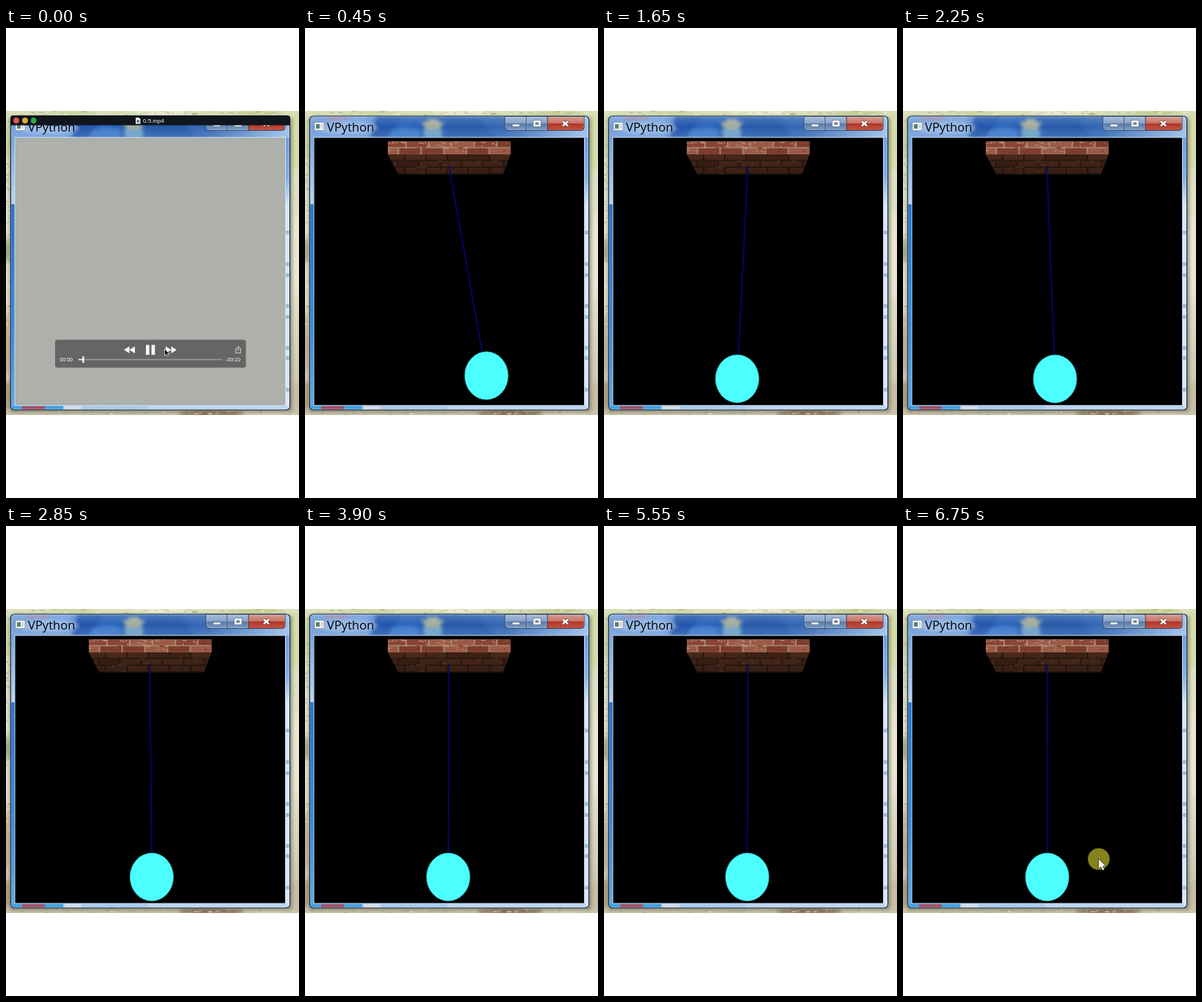
Write an HTML page that moves like this. It is 400 px wide and 640 px high and loops after 6.9 s.

```html
<!DOCTYPE html>
<html lang="en">
<head>
<meta charset="utf-8">
<title>Damped pendulum</title>
<style>
  html, body { margin: 0; width: 100%; height: 100%; overflow: hidden; background: #fff; }
  svg { display: block; width: 400px; height: 640px; }
  .title { font: 16.6px "Open Sans", "Noto Sans", sans-serif; fill: #000; }
  .small { font: 7px "Liberation Sans", Inter, sans-serif; fill: #fff; }
</style>
</head>
<body>
<svg viewBox="0 0 400 640">
  <defs>
    <linearGradient id="wall" x2="0" y2="1">
      <stop offset="0" stop-color="#d9dfb9"/><stop offset=".25" stop-color="#dfe1c5"/>
      <stop offset=".6" stop-color="#e3dfcb"/><stop offset="1" stop-color="#c8c1a9"/>
    </linearGradient>
    <linearGradient id="caption">
      <stop offset="0" stop-color="#6f9ddb"/><stop offset=".2" stop-color="#6f9dda"/>
      <stop offset=".3" stop-color="#2a63b9"/><stop offset=".52" stop-color="#285dae"/>
      <stop offset=".7" stop-color="#3468b4"/><stop offset="1" stop-color="#a0c3ea"/>
    </linearGradient>
    <linearGradient id="sheen" x2="0" y2="1">
      <stop offset="0" stop-color="#fff" stop-opacity=".2"/><stop offset=".5" stop-color="#fff" stop-opacity="0"/>
      <stop offset="1" stop-color="#bfe0ff" stop-opacity=".18"/>
    </linearGradient>
    <linearGradient id="leftTop" x2="0" y2="1">
      <stop offset="0" stop-color="#6fa4e0"/><stop offset="1" stop-color="#b5d5f3"/>
    </linearGradient>
    <linearGradient id="leftLow" x2="0" y2="1">
      <stop offset="0" stop-color="#1f6fd0"/><stop offset=".6" stop-color="#3089dd"/><stop offset="1" stop-color="#5aa7e8"/>
    </linearGradient>
    <linearGradient id="rightTop" x2="0" y2="1">
      <stop offset="0" stop-color="#6c9fdd"/><stop offset=".6" stop-color="#7fb1e8"/><stop offset="1" stop-color="#d3e6f8"/>
    </linearGradient>
    <linearGradient id="button" x2="0" y2="1">
      <stop offset="0" stop-color="#a9bfdc"/><stop offset=".48" stop-color="#86a2c8"/>
      <stop offset=".5" stop-color="#5878a4"/><stop offset="1" stop-color="#7c9fca"/>
    </linearGradient>
    <linearGradient id="close" x2="0" y2="1">
      <stop offset="0" stop-color="#d89d94"/><stop offset=".48" stop-color="#c67367"/>
      <stop offset=".5" stop-color="#ae3528"/><stop offset="1" stop-color="#c75442"/>
    </linearGradient>
    <linearGradient id="shade" x2="0" y2="1">
      <stop offset="0" stop-color="#000" stop-opacity=".05"/><stop offset="1" stop-color="#000" stop-opacity=".3"/>
    </linearGradient>
    <filter id="soft" x="-50%" y="-50%" width="200%" height="200%"><feGaussianBlur stdDeviation="2"/></filter>
    <filter id="edge" x="-10%" y="-10%" width="120%" height="120%"><feGaussianBlur stdDeviation=".7"/></filter>
    <clipPath id="wallClip"><rect y="113" width="400" height="414"/></clipPath>
    <clipPath id="winClip"><rect x="6" y="120" width="382" height="400" rx="5"/></clipPath>
    <clipPath id="frontClip"><path d="M113 154.500H280.500V172H113Z"/></clipPath>
    <clipPath id="underClip"><path d="M113 172H280.500L270 199.500H127.500Z"/></clipPath>
  </defs>

  <g clip-path="url(#wallClip)">
    <rect y="113" width="400" height="414" fill="url(#wall)"/>
    <g filter="url(#soft)" id="foliage"></g>
    <g filter="url(#edge)" id="grain"></g>
    <rect x="5" y="121" width="386" height="402" rx="5" fill="#4a4a3c" opacity=".45" filter="url(#soft)"/>
  </g>

  <g clip-path="url(#winClip)">
    <rect x="6" y="119" width="382" height="402" fill="#a9caee"/>
    <rect x="6" y="119" width="382" height="31" fill="url(#caption)"/>
    <g filter="url(#soft)">
      <path d="M98 119H134L112 150H90Z" fill="#2257ac"/>
      <path d="M118 140Q138 130 156 139V150H114Z" fill="#3a78ca"/>
      <path d="M159 128H167V124H182V128H189L184 138H165Z" fill="#a3ad9d"/>
      <path d="M161 138H187V150H163Z" fill="#6a9fc4"/>
      <path d="M192 124H238L258 150H192Z" fill="#275aa9"/>
      <path d="M30 120H62L54 126H26Z" fill="#c06f83" opacity=".5"/>
      <ellipse cx="58" cy="136" rx="41" ry="8" fill="#b8d0ef" opacity=".55"/>
    </g>
    <rect x="6" y="119" width="382" height="31" fill="url(#sheen)"/>
    <rect x="6" y="149" width="7" height="91" fill="url(#leftTop)"/>
    <rect x="6" y="240" width="7" height="281" fill="url(#leftLow)"/>
    <rect x="381" y="149" width="7" height="91" fill="url(#rightTop)"/>
    <rect x="381" y="240" width="7" height="281" fill="#dae7f6"/>
    <g filter="url(#edge)" id="streaks"></g>
    <g filter="url(#edge)">
      <rect x="6" y="514" width="72" height="6" fill="#3f9fe2"/>
      <rect x="22" y="515" width="31" height="5" fill="#a34c65"/>
      <rect x="80" y="515" width="23" height="5" fill="#d4dce9"/>
      <rect x="104" y="514" width="90" height="6" fill="#a9cbee"/>
      <rect x="194" y="514" width="190" height="6" fill="#bcd6f1"/>
    </g>
  </g>
  <rect x="6.500" y="120" width="381" height="400" rx="5" fill="none" stroke="#17283f" stroke-width="1.200"/>
  <rect x="7.600" y="121.100" width="378.800" height="397.800" rx="4" fill="none" stroke="#e4f2ff" stroke-opacity=".45" stroke-width=".8"/>

  <rect x="13" y="128.500" width="13" height="11" fill="#f4f5f2" stroke="#8a9299" stroke-width=".7"/>
  <rect x="15" y="131" width="5" height="6" fill="#52807a"/>
  <rect x="21" y="131" width="3.500" height="6" fill="#d5d9d8"/>
  <text class="title" x="30" y="140.500">VPython</text>

  <g stroke="#2d4059" stroke-width=".9">
    <path d="M273 120.500H302V139.500H277Q273 139.500 273 135.500Z" fill="url(#button)"/>
    <path d="M302 120.500H331V139.500H302Z" fill="url(#button)"/>
    <path d="M331 120.500H381V135.500Q381 139.500 377 139.500H331Z" fill="url(#close)"/>
  </g>
  <path d="M274 135.500V121.300H301V138.700H277M303 121.300H330V138.700H303ZM332 121.300H380V136" fill="none" stroke="#fff" stroke-opacity=".4" stroke-width=".6"/>
  <rect x="283" y="131" width="10" height="3.200" fill="#fff" stroke="#4c5a70" stroke-width=".6"/>
  <path d="M311.500 125.500H322V134.500H311.500ZM314.800 128.700V131.300H318.700V128.700Z" fill="#fff" fill-rule="evenodd" stroke="#4c5a70" stroke-width=".6"/>
  <g fill="none" stroke-width="4"><path d="M351.500 126.800L359.300 133.600M359.300 126.800L351.500 133.600" stroke="#6d322e"/>
    <path d="M351.800 127L359 133.400M359 127L351.800 133.400" stroke="#fff" stroke-width="2.500"/></g>

  <rect x="12" y="149" width="369.500" height="365" fill="#000" stroke="#cfe0f3" stroke-width="1"/>

  <g id="scene">
    <g clip-path="url(#frontClip)"><rect x="113" y="154" width="168" height="18" fill="#a08770"/><g id="front" filter="url(#edge)"></g></g>
    <g clip-path="url(#underClip)"><rect x="113" y="172" width="168" height="28" fill="#2a1c11"/><g id="under" filter="url(#edge)"></g>
      <rect x="113" y="172" width="168" height="28" fill="url(#shade)"/></g>
    <path id="rod" stroke="#07076c" stroke-width="1.800"/>
    <ellipse id="ball" rx="29.600" ry="32.600" fill="#4dfefe" stroke="#38c3c5" stroke-width=".8" filter="url(#edge)"/>
  </g>

  <g id="blank">
    <rect x="12.500" y="149.500" width="368.500" height="364" fill="#adb0ab" stroke="#d5dcda"/>
    <rect x="13" y="150" width="367.500" height="363" fill="none" stroke="#777d7c" stroke-width=".7" stroke-dasharray="1 1"/>
  </g>

  <g id="player">
    <path d="M6 132.500V123Q6 119 10 119H384Q388 119 388 123V132.500Z" fill="#10151e"/>
    <circle cx="14" cy="126" r="3.900" fill="#e8574e"/>
    <circle cx="26" cy="126" r="3.900" fill="#e5ac33"/>
    <circle cx="37.700" cy="126" r="3.900" fill="#36a746"/>
    <path d="M177 122H181.500L183.500 124V130.500H177Z" fill="#eef1f4"/>
    <circle cx="180.200" cy="127" r="2" fill="#5b7287"/>
    <text class="small" x="187" y="129" style="font-size:8px">0.5.mp4</text>

    <rect x="67" y="424.500" width="260.500" height="38" rx="3" fill="#646564"/>
    <g fill="#f6f6f6">
      <path d="M168.500 433.500V443L161 438.200ZM176 433.500V443L168.500 438.200Z"/>
      <path d="M191 431.500H195.700V445H191ZM198.600 431.500H203.300V445H198.600Z"/>
      <path d="M218 433.500V443L225.500 438.200ZM225.500 433.500V443L233 438.200Z"/>
    </g>
    <path d="M315.500 436.500H313.700V442.500H320.300V436.500H318.500M317 440V433.500M315 435.500L317 433.500L319 435.500" fill="none" stroke="#ddd" stroke-width=".9"/>
    <text class="small" x="73.500" y="454.300">00:00</text>
    <text class="small" x="300" y="454.300">-00:10</text>
    <path d="M99 451.500H295" stroke="#9a9b9a" stroke-width="1.500"/>
    <path id="played" stroke="#f2f2f2" stroke-width="1.500"/>
    <rect id="knob" y="447" width="2.200" height="9" rx=".8" fill="#fff"/>
    <path d="M216.500 437V446L218.600 444.200L220 447.300L221.700 446.500L220.300 443.500H223Z" fill="#000" stroke="#fff" stroke-width=".7"/>
  </g>

  <g id="pointer">
    <circle cx="267.200" cy="453.500" r="14.800" fill="#86831c"/>
    <path d="M267 453V467L270.200 464.200L272.500 469L275 468L272.800 463.200H277Z" fill="#fff" stroke="#222" stroke-width=".7"/>
  </g>
</svg>
<script>
const LOOP = 6900, STEP = 150;
const $ = id => document.getElementById(id);

function add(parent, tag, attrs) {
  const node = document.createElementNS('http://www.w3.org/2000/svg', tag);
  for (const key in attrs) node.setAttribute(key, attrs[key]);
  $(parent).appendChild(node);
}

let seed = 17;
const rand = () => (seed = seed * 16807 % 2147483647) / 2147483647;
const pick = list => list[Math.floor(rand() * list.length)];

function bricks(id, top, rows, height, width, colors) {
  for (let r = 0; r < rows; r++) {
    for (let x = 113 - (r % 2 ? width / 2 : 5); x < 281; x += width)
      add(id, 'rect', { x, y: top + r * height, width: width - 2, height: height - 1.6, fill: pick(colors) });
  }
}

function specks(id, x, y, width, height, count, colors) {
  for (let i = 0; i < count; i++)
    add(id, 'ellipse', {
      cx: x + rand() * width, cy: y + rand() * height, rx: 1 + rand() * 3, ry: 1,
      fill: pick(colors), opacity: .3 + rand() * .4
    });
}

bricks('front', 154, 2, 9.7, 31, ['#8c4433', '#96503c', '#7e3c2d', '#9c5a46']);
specks('front', 113, 154, 168, 4, 30, ['#cfae96', '#b99a80']);
specks('front', 113, 158, 168, 14, 26, ['#cfae96', '#6d3225']);
bricks('under', 172, 3, 9.2, 29, ['#4b281b', '#532c1d', '#422217', '#4d2a1c']);
specks('under', 113, 172, 168, 26, 22, ['#6f573c', '#2b170f']);

const paper = ['#f0f0df', '#b9bf93', '#cfd0b0', '#aaa687'];
specks('grain', 0, 113, 400, 6, 70, paper);
specks('grain', 0, 120, 5, 400, 70, paper);
specks('grain', 0, 522, 400, 5, 60, paper);

for (const y of [276, 319, 334, 376, 391, 433, 447, 490])
  add('streaks', 'rect', { x: 381, y, width: 6, height: 5, fill: '#8ea9d2', opacity: .75 });

// Blurred wallpaper patches: x, y, rx, ry, colour
for (const [cx, cy, rx, ry, fill] of [
  [90, 115, 34, 3, '#c9d49b'], [215, 115, 40, 3, '#eeeed9'], [345, 115, 35, 4, '#c4cf91'],
  [2, 155, 4, 25, '#ccd4a7'], [2, 250, 4, 30, '#e6e4d3'], [2, 303, 3, 17, '#9a9d80'],
  [1, 430, 4, 42, '#bcb194'], [2, 500, 5, 20, '#ad9d7c'], [395, 155, 7, 40, '#d6dca9'],
  [396, 310, 5, 60, '#ede6d5'], [396, 500, 6, 18, '#c7bea3'], [150, 525, 55, 3, '#c3c0aa'],
  [280, 525, 45, 4, '#8a7154'], [355, 525, 30, 3, '#d4ccba']
]) add('foliage', 'ellipse', { cx, cy, rx, ry, fill });

const show = (id, on) => $(id).style.display = on ? '' : 'none';

// Damped swing, released from the right
const RELEASE = 350, PERIOD = 2080, DECAY = .00079;
function offset(t) {
  const s = Math.max(0, t - RELEASE);
  return 58 * Math.exp(-DECAY * s) * Math.cos(2 * Math.PI * s / PERIOD);
}

function draw(t) {
  const px = 196.5, py = 188, len = 290;
  const dx = offset(t), dy = Math.sqrt(len * len - dx * dx), k = 257 / len;
  $('rod').setAttribute('d', `M${px} ${py}L${px + dx * k} ${py + dy * k}`);
  $('ball').setAttribute('cx', px + dx);
  $('ball').setAttribute('cy', py + dy);

  const head = 105.5 + t * .0284;
  $('played').setAttribute('d', `M99 451.5H${head}`);
  $('knob').setAttribute('x', head - 1.1);

  show('blank', t < 300);
  show('player', t < 450);
  show('pointer', t >= 6600);
}

function tick() {
  draw(Math.floor(performance.now() % LOOP / STEP) * STEP);
  requestAnimationFrame(tick);
}
tick();
</script>
</body>
</html>
```
